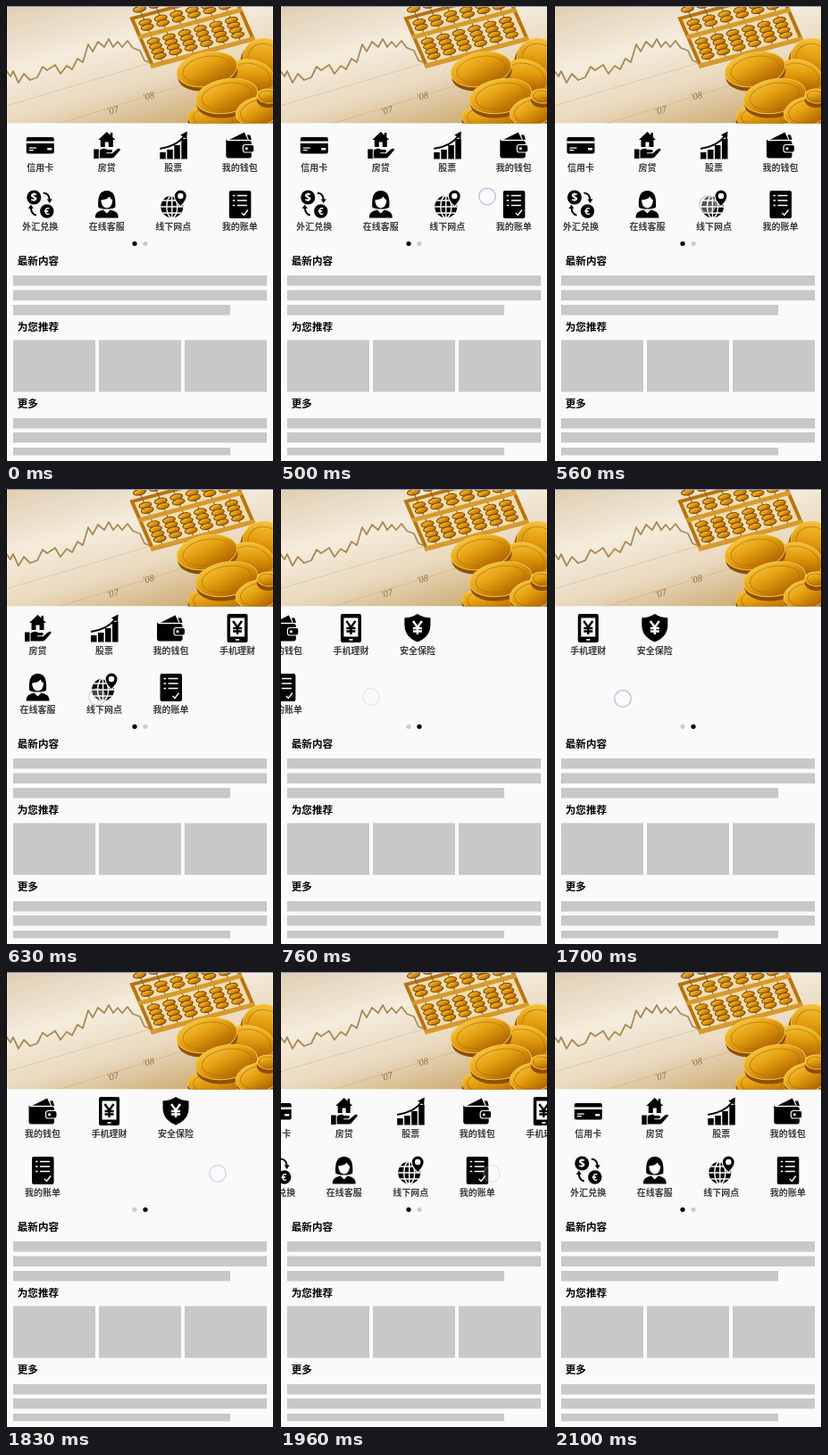
An HTML page that plays this animation: 300 px wide and 510 px high, repeating every 2600 ms.

```html
<!DOCTYPE html>
<html lang="zh-CN">
<head>
<meta charset="utf-8">
<title>理财首页</title>
<style>
html, body { margin: 0; height: 100%; overflow: hidden; background: #fafafa; }
svg { display: block; width: 100vw; height: 100vh; }
text { font-family: "Noto Sans CJK SC", "Noto Sans CJK", "Noto Sans", sans-serif; font-weight: 700; }
.label { font-size: 10px; fill: #3c3c3c; text-anchor: middle; }
.heading { font-size: 11.6px; }
.sign { fill: #fff; text-anchor: middle; font-family: "Open Sans", "DejaVu Sans", sans-serif; }
.w { fill: #fff; }
.line { fill: none; stroke: #000; stroke-width: 2; }
.cut { fill: none; stroke: #fff; stroke-width: 1.4; }
.year { font: italic 10px "Noto Serif", serif; fill: #7d6238; opacity: .8; }
</style>
</head>
<body>
<svg viewBox="0 0 300 510">
  <defs>
    <linearGradient id="paper" x1="0" y1="0" x2=".65" y2="1">
      <stop offset="0" stop-color="#dfceb2"/>
      <stop offset=".4" stop-color="#f5ecdd"/>
      <stop offset=".7" stop-color="#e9d9be"/>
      <stop offset="1" stop-color="#d0af7a"/>
    </linearGradient>
    <linearGradient id="gold" x1="0" y1="0" x2=".6" y2="1">
      <stop offset="0" stop-color="#fbd04e"/>
      <stop offset=".5" stop-color="#e5a010"/>
      <stop offset="1" stop-color="#b06500"/>
    </linearGradient>
    <clipPath id="photoArea"><rect width="300" height="131.5"/></clipPath>

    <g id="card">
      <rect x="-15.500" y="-9" width="31" height="18.500" rx="2"/>
      <path class="w" d="M-15.500-4.500h31v2.500h-31zM-12.500 2.500h8v1.300h-8zM-12.500 5h5v1.300h-5zM8 3h5v2.500h-5z"/>
    </g>
    <g id="house">
      <path d="M0-15 9.500-6H7V2H2V-3.500H-2V2H-7V-6H-9.500zM4-14h2.500v6H4z"/>
      <path d="M-14.500 4.500h5.500v10.500h-5.500zM-8 5.500Q-3 2.500 0 5H5Q7.500 6.500 5 8.300H-.5V9.300H6L11.500 4.500Q15.500 2.500 15 5.500L8 13.500Q7 14.500 5 14.500H-8z"/>
    </g>
    <g id="growth">
      <path d="M-15 8h6.500v7.500h-6.500zM-7 5h6.500v10.500h-6.500zM1 0h6.500v15.500H1zM9-7h6.500v22.500H9z"/>
      <path class="line" d="M-15 4Q4 1 12-10"/>
      <path d="M8-11.500 15.500-15.500 15-6.500z"/>
    </g>
    <g id="wallet">
      <path d="M-12-6 5-14.500 9-6zM8-11.500h3.500L13-6H10z"/>
      <path d="M-15.500-7Q-15.500-5-13-5H10Q13-5 13-2V11.500Q13 14.500 10.500 14.500H-13Q-15.500 14.500-15.500 11.500z"/>
      <path class="cut" d="M-13.500-5.500H9"/>
      <rect x="3.500" y="-.5" width="12.500" height="8.500" rx="2.500" stroke="#fafafa" stroke-width="1.200"/>
      <circle class="w" cx="7.500" cy="3.700" r="1.500"/>
    </g>
    <g id="exchange">
      <circle cx="-7" cy="-7.500" r="8"/><circle cx="7.500" cy="8" r="7.700"/>
      <text class="sign" x="-7" y="-2.700" font-size="13">$</text>
      <text class="sign" x="7.300" y="12" font-size="11">€</text>
      <path class="line" d="M3.500-12.500Q10-12 10.500-5M-10.500 4Q-10 11.500-4.500 12.500"/>
      <path d="M7.500-5.500h6L10.500-1zM-13.500 5h6L-10.500.5z"/>
    </g>
    <g id="agent">
      <path d="M-9.500 3.500Q-11-15 0-15T9.500 3.500Q7 5.500 0 5.500T-9.500 3.500z"/>
      <path class="w" d="M-6.500-4.500Q1-5 3-8.500 4-5.500 6.500-4.500 6 4 0 4.500-6 4-6.500-4.500z"/>
      <path d="M-13 15.500Q-13.500 8-4 6.500L0 10.500 4 6.500Q13.500 8 13 15.500z"/>
    </g>
    <g id="globe">
      <circle cx="-1.500" cy="3" r="12.500"/>
      <path class="cut" d="M-1.500-10v26M-14 3H11M-12-4H9M-12 10H9"/>
      <ellipse class="cut" cx="-1.500" cy="3" rx="6" ry="12.500"/>
      <path d="M8 3Q1-4 1-9A7 7 0 0 1 15-9Q15-4 8 3z" stroke="#fafafa" stroke-width="1.200"/>
      <circle class="w" cx="8" cy="-9" r="3.200"/>
    </g>
    <g id="bill">
      <rect x="-12" y="-15" width="24.500" height="31" rx="2"/>
      <path class="cut" d="M-3-9.500H8M-8-9.500h2.500M-3-4H8M-8-4h2.500M-3 1.500H8M-8 1.500h2.500"/>
      <path class="cut" d="M2 10 4.500 12.500 9 6.500"/>
    </g>
    <g id="phone">
      <rect x="-11.500" y="-16" width="23" height="32" rx="2"/>
      <path class="w" d="M-8-11.500h16v21h-16zM-2 12h4v1.700h-4z"/>
      <use href="#yuan" stroke="#000"/>
    </g>
    <g id="shield">
      <path d="M0-16Q6-12 14.500-11.500V-3Q14 10 0 15.500-14 10-14.500-3V-11.500Q-6-12 0-16z"/>
      <use href="#yuan" stroke="#fff"/>
    </g>
    <path id="yuan" fill="none" stroke-width="2.400" d="M-5-8 0-1 5-8M0-1V7M-5 0H5M-5 3.500H5"/>
  </defs>

  <rect width="300" height="510" fill="#fafafa"/>
  <g id="pager"></g>

  <g clip-path="url(#photoArea)">
    <rect width="300" height="131.500" fill="url(#paper)"/>
    <path d="M0 112 215 48M0 150 210 85" stroke="#b99c6c" stroke-width=".7" opacity=".5"/>
    <path fill="none" stroke="#a98a55" stroke-width="1.800" stroke-linejoin="round" d="M0 72 5 79 8 73 14 86 20 76 27 83 35 80 41 68 46 72 55 66 61 76 68 67 74 71 80 59 86 63 92 43 97 51 103 40 110 46 115 37 120 46 125 40 130 46 136 39 142 47 150 50 155 61 160 63"/>
    <text class="year" transform="translate(114 122) rotate(-14)">'07</text>
    <text class="year" transform="translate(154 106) rotate(-14)">'08</text>
    <g id="abacus" transform="matrix(.97 -.26 .4 .92 141 14)"></g>
    <g id="coins"></g>
    <rect width="300" height="1" fill="#8d96bd"/>
  </g>

  <g id="blocks" fill="#c8c8c8"></g>
  <text class="heading" x="12.700" y="289.900">最新内容</text>
  <text class="heading" x="12.700" y="363.900">为您推荐</text>
  <text class="heading" x="12.700" y="449.900">更多</text>
  <circle id="dot0" cx="144" cy="266.300" r="2.600"/>
  <circle id="dot1" cx="156" cy="266.300" r="2.600"/>
  <circle id="touch" r="9.300" fill="#fff" fill-opacity=".4" stroke="#b9bfe4" stroke-width="1.300"/>
  <path d="M0 0h1v510H0zM299 0h1v510h-1z"/>
</svg>
<script>
const $ = id => document.getElementById(id);
const COLUMN = 74.5, PAGE = COLUMN * 4;

// icon, label, column, row
const items = [
  ['card', '信用卡', 0, 0], ['house', '房贷', 1, 0], ['growth', '股票', 2, 0], ['wallet', '我的钱包', 3, 0],
  ['exchange', '外汇兑换', 0, 1], ['agent', '在线客服', 1, 1], ['globe', '线下网点', 2, 1], ['bill', '我的账单', 3, 1],
  ['phone', '手机理财', 4, 0], ['shield', '安全保险', 5, 0]
];
$('pager').innerHTML = items.map(([icon, label, col, row]) =>
  `<g transform="translate(${38.3 + col * COLUMN} ${156 + row * 66})">
    <use href="#${icon}"/><text class="label" y="29.100">${label}</text></g>`).join('');

const rect = (x, y, w, h, extra = '') => `<rect x="${x}" y="${y}" width="${w}" height="${h}" ${extra}/>`;
$('blocks').innerHTML =
  rect(8, 302, 284, 11.5) + rect(8, 318.5, 284, 11.5) + rect(8, 335, 243, 11.5) +
  [8, 104, 200].map(x => rect(x, 374.5, 92, 58)).join('') +
  rect(8, 462, 284, 11.5) + rect(8, 478, 284, 11.5) + rect(8, 495, 243, 8.5);

let abacus = rect(0, 0, 116, 58, 'fill="#f3ddb0" stroke="#b8740f" stroke-width="4"');
for (let x = 12; x < 112; x += 18) {
  abacus += rect(x - .5, -30, 1, 88, 'fill="#8a5a18"');
  for (const y of [-8, 8, 14, 31, 37, 43, 49])
    abacus += `<ellipse cx="${x}" cy="${y}" rx="7" ry="3.300" fill="url(#gold)" stroke="#7a4200"/>`;
}
abacus += rect(-2, 20, 120, 5, 'fill="#d79a2c"') + rect(-2, 55, 120, 5, 'fill="#d79a2c"');
$('abacus').innerHTML = abacus;

const coin = ([x, y, rx, ry, angle]) => `<g transform="translate(${x} ${y}) rotate(${angle})">
  <ellipse cy="5" rx="${rx}" ry="${ry}" fill="#8f4f00"/>
  <ellipse rx="${rx}" ry="${ry}" fill="url(#gold)" stroke="#f3c548"/>
  <ellipse rx="${rx * .8}" ry="${ry * .76}" fill="none" stroke="#b07008" opacity=".7"/></g>`;
$('coins').innerHTML = [
  [292, 62, 28, 24, 35], [276, 78, 26, 17, 20], [225, 71, 34, 19, -10],
  [232, 126, 28, 15, 5], [247, 101, 35, 19, -10], [283, 118, 26, 16, -12], [293, 101, 12, 8, 5]
].map(coin).join('');

const SWIPE = 400, STEPS = 6;      // shown in seven stepped poses
const DRAG = 130;                  // finger travel time
const SLIDE_DELAY = 30, SLIDE = 300;
const swipes = [
  { start: 500, from: [232, 213.5], to: [102, 233], base: 0, dir: 1 },
  { start: 1700, from: [77, 235], to: [237, 226], base: PAGE, dir: -1 }
];
const clamp = v => Math.max(0, Math.min(1, v));
const smooth = p => p * p * (3 - 2 * p);
const stepTime = step => Math.floor(step * SWIPE / STEPS / 10) * 10;

function held(elapsed) {
  let step = STEPS;
  while (stepTime(step) > elapsed) step--;
  return stepTime(step);
}

function draw(t) {
  let scroll = 0, alpha = 0;
  for (const { start, from, to, base, dir } of swipes) {
    if (t < start) continue;
    const time = held(t - start);
    const [x, y] = from.map((v, i) => v + (to[i] - v) * clamp(time / DRAG));
    scroll = base + dir * PAGE * smooth(clamp((time - SLIDE_DELAY) / SLIDE));
    alpha = 1 - time / SWIPE;
    $('touch').setAttribute('transform', `translate(${x} ${y})`);
  }
  const second = scroll > PAGE / 2;
  $('pager').setAttribute('transform', `translate(${-scroll} 0)`);
  $('touch').setAttribute('opacity', alpha);
  $('dot0').setAttribute('fill', second ? '#ccc' : '#000');
  $('dot1').setAttribute('fill', second ? '#000' : '#ccc');
}

function tick() {
  draw(performance.now() % 2600);
  requestAnimationFrame(tick);
}
tick();
</script>
</body>
</html>
```
